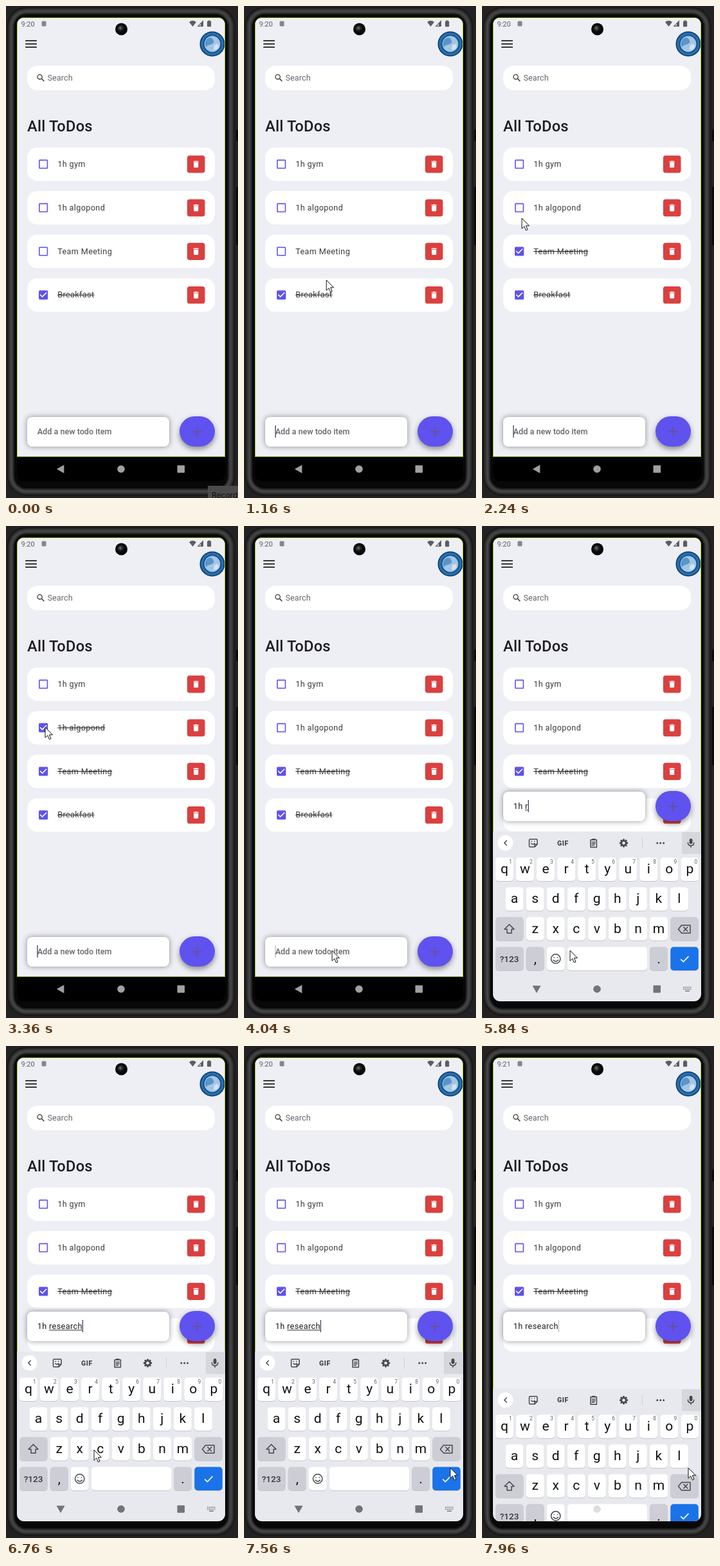
Animation, 361 px wide and 765 px high, one loop 8000 ms. Source, as an HTML page:

```html
<!DOCTYPE html>
<html lang="en">
<head>
<meta charset="utf-8">
<title>Todo app</title>
<style>
html, body { margin: 0; width: 100%; height: 100%; overflow: hidden; background: #222; }
svg { display: block; width: 100%; height: 100%; font-family: Roboto, sans-serif; }
text { white-space: pre; }
.item { font-size: 12.6px; letter-spacing: .4px; fill: #3a3a3a; }
.hint { font-size: 12.6px; letter-spacing: .1px; fill: #66666a; }
.strong { font-weight: 500; letter-spacing: 0; }
.done { text-decoration: line-through; }
.key { font-size: 21px; text-anchor: middle; fill: #111; }
.sup { font-size: 8.5px; text-anchor: middle; fill: #5f6368; }
.field { filter: drop-shadow(0 0 4px rgba(0, 0, 0, .42)); }
.fab { filter: drop-shadow(0 4px 4px rgba(0, 0, 0, .42)); }
.line { fill: none; stroke: #46484d; stroke-width: 1.5; stroke-linecap: round; stroke-linejoin: round; }
</style>
</head>
<body>
<svg id="stage" viewBox="0 0 361 765" preserveAspectRatio="none"></svg>
<script>
const LOOP = 8000;
const stage = document.getElementById('stage');
const $ = id => document.getElementById(id);
const clamp = v => Math.max(0, Math.min(1, v));
const span = (t, a, b) => clamp((t - a) / (b - a));
const easeOut = (p, n) => 1 - (1 - p) ** n;
const smooth = p => p * p * (3 - 2 * p);

const rect = (x, y, w, h, r, fill, more = '') =>
  `<rect x="${x}" y="${y}" width="${w}" height="${h}" rx="${r}" fill="${fill}" ${more}/>`;
const disc = (x, y, r, fill, more = '') =>
  `<circle cx="${x}" cy="${y}" r="${r}" fill="${fill}" ${more}/>`;
const text = (x, y, cls, s, more = '') =>
  `<text x="${x}" y="${y}" class="${cls}" ${more}>${s}</text>`;
const path = (d, more = 'class="line"') => `<path d="${d}" ${more}/>`;
// Places a 24-unit icon with its middle at x, y
const icon = (x, y, size, body) =>
  `<g transform="translate(${x - size / 2} ${y - size / 2}) scale(${size / 24})">${body}</g>`;

function phone() {
  const shades = ['#161616', '#2c2c2c', '#383838', '#474747', '#3a3a3a', '#222', '#080808'];
  return rect(0, 0, 361, 765, 0, '#222')
    + rect(358, 192, 3, 18, 1, '#0a0a0a') + rect(358, 281, 3, 91, 1, '#0a0a0a')
    + shades.map((c, i) => {
      const d = 1.5 + i * 1.9;
      return rect(d, d, 358 - 2 * d, 763 - 2 * d, 32 - d, c);
    }).join('');
}

function statusBar() {
  const grey = '#5d5d62';
  return text(23.5, 31.5, '', '9:20', `id="clock" font-size="11" fill="${grey}"`)
    + rect(55.5, 23.5, 7, 8, 1.5, '#85858a')
    + path('M290.5 32 L285 25 Q290.5 20.6 296 25Z', `fill="${grey}"`)
    + path('M298.8 31.3 H306.4 V23.4Z', `fill="none" stroke="${grey}" stroke-width="1.2"`)
    + path('M303 31.3 H306.4 V23.4 L303 27Z', `fill="${grey}"`)
    + rect(313, 23.6, 6.2, 8.6, 1, grey) + rect(314.7, 22.4, 2.8, 2, 0, grey);
}

function header() {
  return icon(39, 59, 23.6, path('M3 18h18v-2H3zM3 13h18v-2H3zM3 6v2h18V6z', 'fill="#3a3a3a"'))
    + disc(321, 59, 19.5, '#143b66') + disc(321, 59, 17.8, '#2472b4')
    + disc(321, 59, 14.6, '#1a528f') + disc(321, 59, 12.4, '#a3c6e4')
    + path('M312 52 Q318 46 322 52 T318 60 T312 65 Q307 58 312 52Z', 'fill="#5a95c9"')
    + path('M324 61 Q330 57 331 62 T323 69Z', 'fill="#d3e3f1"')
    + rect(33, 93, 292, 38, 16, '#fff')
    + icon(54.2, 111.8, 15.8, '<circle cx="9.5" cy="9.5" r="5.5" fill="none" stroke="#3a3a3a" stroke-width="2"/>'
      + path('M14 14 L19.8 19.8', 'stroke="#3a3a3a" stroke-width="2.2"'))
    + text(64.5, 116, 'hint', 'Search')
    + text(33, 195.3, '', 'All ToDos', 'font-size="23.6" font-weight="500" letter-spacing=".27" fill="#1d1b20"');
}

function tile(label, i) {
  return `<g transform="translate(0 ${(i * 67.8).toFixed(1)})">`
    + rect(33, 220, 292, 52, 15.8, '#fff')
    + icon(58.1, 245.9, 18.9,
      rect(4, 4, 16, 16, 1, 'none', `id="box${i}" stroke="#5f52ee" stroke-width="2"`)
      + path('M5.7 11.3 L10 15.6 L18.3 7.3', `id="tick${i}" fill="none" stroke="#fff" stroke-width="2"`))
    + text(80.2, 250, 'item', label, `id="label${i}"`)
    + rect(281.9, 232.6, 27.6, 26.8, 3.9, '#da4040')
    + icon(295.7, 246, 14.2,
      path('M6 19c0 1.1.9 2 2 2h8c1.1 0 2-.9 2-2V7H6zM19 4h-3.5l-1-1h-5l-1 1H5v2h14z', 'fill="#fff"'))
    + '</g>';
}

function entry() {
  return '<g id="entry">'
    + rect(33, 639, 221, 46, 8, '#fff', 'class="field"')
    + text(48.7, 665.6, 'hint strong', 'Add a new todo item', 'id="hint"')
    + text(48.7, 665.6, 'item', '', 'id="typed" style="fill:#1d1b20"')
    + rect(66.5, 667.3, 0, 1, 0, '#333', 'id="rule"')
    + rect(48.2, 652, 1.5, 19, 0, '#5b5374', 'id="caret"')
    + rect(270, 638, 55, 47, 23.5, '#5f52ee', 'class="fab"')
    + path('M297.3 654.7V669.3M290 662H304.6', 'stroke="#6750a4" stroke-width="2.2"')
    + '</g>';
}

function keycap(x, y, w, fill = '#fff') {
  return rect(x, y + 1, w, 36.5, 5, '#c3c5cb') + rect(x, y, w, 36.5, 5, fill);
}

function keyboard() {
  const dim = '#cdced5';
  const row = (letters, x0, y, nums) => [...letters].map((c, i) => {
    const x = x0 + i * 32.05;
    return keycap(x - 14, y, 28) + text(x, y + 24.5, 'key', c)
      + (nums ? text(x + 9.5, y + 9, 'sup', (i + 1) % 10) : '');
  }).join('');
  const gear = Array.from({ length: 8 }, (_, i) =>
    rect(219.1, 486.4, 2.8, 4, .6, '#46484d', `transform="rotate(${i * 45} 220.5 493)"`)).join('');
  return '<g id="keyboard">' + rect(17, 475, 324, 270, 0, '#e8e9ee')
    + rect(311, 476, 30, 34, 0, '#d6d7dd')
    + disc(36.5, 492.7, 12, '#fff') + path('M38.2 489.2 L34.8 492.7 L38.2 496.2')
    + path('M75 487 H84.5 Q86 487 86 488.5 V495 L82 499 H75 Q73.5 499 73.5 497.5 V488.5 Q73.5 487 75 487Z M86 495 H82 V499 M76.8 493.5 Q79 496.5 81.8 493.5 M77.2 490.3v.1M81.8 490.3v.1')
    + text(126, 496.6, '', 'GIF', 'font-size="10.5" font-weight="900" letter-spacing=".6" text-anchor="middle" fill="#46484d"')
    + path('M169 488 H178.4 V499.5 H169Z M171.5 487H176M171.2 491.6H176.2M171.2 494H176.2M171.2 496.4H174.5')
    + gear + '<circle cx="220.5" cy="493" r="3.6" fill="none" stroke="#46484d" stroke-width="2.4"/>'
    + rect(249, 484, 1, 18, 0, '#cfd0d6')
    + [272.8, 277.7, 282.6].map(x => disc(x, 493, 1.5, '#46484d')).join('')
    + rect(322.7, 486, 4.8, 8.6, 2.4, '#46484d')
    + path('M320.4 492.5 Q320.6 497 325.1 497 Q329.6 497 329.8 492.5 M325.1 497 V499.5')
    + row('qwertyuiop', 34.9, 515.6, true) + row('asdfghjkl', 50.5, 561.8) + row('zxcvbnm', 82.7, 608)
    + keycap(21, 608, 43.5, dim) + path('M42.5 619.5 L35 627 H39 V633 H46 V627 H50Z')
    + keycap(293.3, 608, 43.5, dim)
    + path('M310.5 620.8 H324 V633 H310.5 L305.5 626.9Z M313.8 623.8 L319.8 630 M319.8 623.8 L313.8 630')
    + keycap(21, 654.5, 43.5, dim)
    + text(42.6, 678, '', '?123', 'font-size="13.5" font-weight="500" text-anchor="middle" fill="#33353a"')
    + keycap(68.7, 654.5, 28, dim) + text(82.7, 680, 'key', ',')
    + keycap(100.7, 654.5, 28)
    + '<circle cx="114.7" cy="673" r="7.2" class="line"/>'
    + path('M111 675 Q114.7 679 118.4 675 M112 670.7v.2M117.4 670.7v.2')
    + keycap(132.8, 654.5, 124.2)
    + keycap(261, 654.5, 28, dim) + text(275, 680, 'key', '.')
    + keycap(293.3, 654.5, 43.5, '#1a73e8')
    + path('M309.3 673.6 L313.3 677.6 L321.5 669.2', 'fill="none" stroke="#fff" stroke-width="1.7"')
    + '</g>';
}

function navBar() {
  const dots = [0, 1, 2, 3, 4].map(i => rect(313 + i * 2.7, 716.5, 1.6, 1.6, 0, '#77777c')
    + rect(313 + i * 2.7, 719.4, 1.6, 1.6, 0, '#77777c')).join('');
  return '<g id="nav">' + path('M-6.5 -5.3 H6.5 L0 6.2Z', 'id="back"')
    + '<circle cx="179" cy="720" r="5.8"/><rect x="266.5" y="714.3" width="11.5" height="11.5" rx="1"/></g>'
    + `<g id="kbIcon">${dots}${rect(316, 722.3, 7, 1.5, 0, '#77777c')}</g>`;
}

stage.innerHTML = `<defs>
    <clipPath id="screen"><rect x="17" y="18" width="324" height="721" rx="11"/></clipPath>
    <radialGradient id="lens" cx=".4" cy=".38"><stop offset="0" stop-color="#777"/><stop offset=".5" stop-color="#2c2c2c"/><stop offset="1" stop-color="#0a0a0a"/></radialGradient>
  </defs>` + phone()
  + '<g clip-path="url(#screen)">' + rect(17, 18, 324, 721, 0, '#000') + rect(17, 18, 324, 683, 0, '#eeeff5')
  + statusBar() + header()
  + ['1h gym', '1h algopond', 'Team Meeting', 'Breakfast'].map(tile).join('')
  + entry()
  + path('M17.5 700.5 V29 Q17.5 18.5 28 18.5 H330 Q340.5 18.5 340.5 29 V700.5Z', 'fill="none" stroke="#b4d834"')
  + keyboard() + navBar() + '</g>'
  + disc(179.5, 36, 9.5, '#080808') + disc(179.2, 35.7, 6, 'url(#lens)')
  + '<g id="record">' + rect(314, 746, 47, 19, 0, '#4b4b4b')
  + text(320, 764.5, '', 'Record', 'font-size="12" fill="#111" style="font-family:Inter,sans-serif"') + '</g>'
  + path('M0 0 V16.2 L3.8 12.7 L6.4 18.8 L9 17.7 L6.4 11.7 H11.4Z', 'id="cursor" fill="#fff" stroke="#111" stroke-width="1"');

// Pointer stops: time, x, y
const stops = [
  [40, 340, 752], [560, 255, 510], [800, 255, 510], [1400, 60, 381], [1720, 60, 381],
  [2240, 62, 330], [2520, 61, 313], [3560, 61, 313], [4000, 137, 660], [6720, 137, 660],
  [6760, 137, 628], [6880, 137, 628], [7200, 300, 640], [7400, 331, 692], [7520, 321, 656]
];
const phrase = '1h research';
// Time of each key press; the blank comes with the third letter
const presses = [5320, 5480, 5840, 5840, 5920, 6000, 6160, 6240, 6320, 6440, 6560];

function pointer(t) {
  const i = stops.findIndex(s => s[0] > t);
  if (i < 0) return stops[stops.length - 1].slice(1);
  if (i === 0) return stops[0].slice(1);
  const [a, b] = [stops[i - 1], stops[i]];
  const p = smooth(span(t, a[0], b[0]));
  return [a[1] + (b[1] - a[1]) * p, a[2] + (b[2] - a[2]) * p];
}

function caretAlpha(t) {
  if (t >= 5320 && t < 6760) return 1;
  const base = t < 4200 ? 0 : t < 5320 ? 4100 : 6400;
  const p = (t - base) % 1000;
  return Math.min(span(p, 0, 120), 1 - span(p, 480, 600));
}

const show = (id, on) => $(id).setAttribute('visibility', on ? 'visible' : 'hidden');

function setDone(i, on) {
  $('box' + i).setAttribute('fill', on ? '#5f52ee' : 'none');
  $('label' + i).setAttribute('class', on ? 'item done' : 'item');
  show('tick' + i, on);
}

function draw(t) {
  setDone(0, false);
  setDone(1, t >= 2680 && t < 3480);
  setDone(2, t >= 1480);
  setDone(3, true);
  $('clock').textContent = t < 7640 ? '9:20' : '9:21';

  const rise = easeOut(span(t, 4240, 4560), 3);
  const drop = t > 7800 ? 57 * ((t - 7800) / 160) ** 2 : 0;
  $('keyboard').setAttribute('transform', `translate(0 ${264 * (1 - rise) + drop})`);
  $('entry').setAttribute('transform', `translate(0 ${-226 * easeOut(span(t, 4320, 4756), 2)})`);

  const open = rise === 1 && drop === 0;
  $('nav').setAttribute('fill', open ? '#737378' : rise > 0 ? '#d0d0d6' : '#a0a0a0');
  $('nav').setAttribute('opacity', drop ? .7 : 1);
  const turn = 90 * (1 - smooth(span(t, 4560, 4720)) + span(t, 7820, 7920));
  $('back').setAttribute('transform', `translate(85 720) rotate(${turn})`);
  show('kbIcon', open);

  const count = presses.filter(p => p <= t).length;
  const typed = $('typed');
  typed.textContent = phrase.slice(0, count);
  show('hint', count === 0);
  const width = count ? typed.getComputedTextLength() : 0;
  $('caret').setAttribute('x', 48.2 + width + (count ? .3 : 0));
  $('caret').setAttribute('opacity', caretAlpha(t));
  const start = count > 3 ? typed.getSubStringLength(0, 3) : 0;
  $('rule').setAttribute('x', 48.7 + start);
  $('rule').setAttribute('width', count > 3 ? width - start : 0);
  show('rule', count > 3 && t < 7800);

  show('record', t < 40);
  show('cursor', t >= 40);
  $('cursor').setAttribute('transform', `translate(${pointer(t).join(' ')})`);
}

const began = performance.now();
function frame() {
  draw((performance.now() - began) % LOOP);
  requestAnimationFrame(frame);
}
frame();
</script>
</body>
</html>
```
